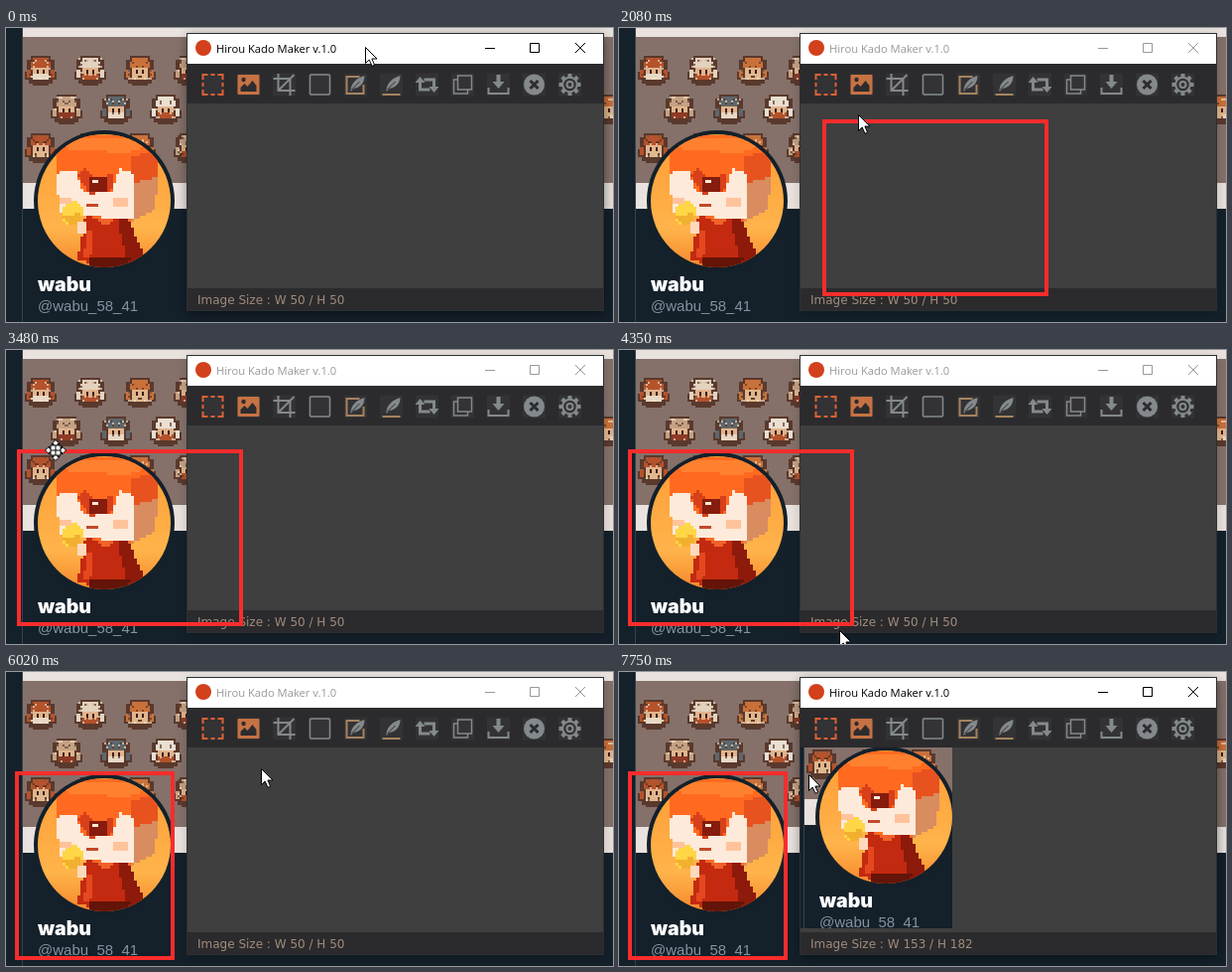
These frames come from a looping animation (612 px wide and 296 px high, 8 s). An HTML page:

```html
<!DOCTYPE html>
<html lang="en">
<head>
<meta charset="utf-8">
<title>Capture tool</title>
<style>
html, body { margin: 0; width: 100%; height: 100%; overflow: hidden; background: #14202a; }
svg { display: block; }
.pixel { shape-rendering: crispEdges; }
.line { fill: none; stroke: currentColor; stroke-width: 2; }
.title { font: 11.2px "Open Sans", "Noto Sans", sans-serif; }
.status { font: 12px "DejaVu Sans", sans-serif; fill: #a08d7c; }
.name { font: 900 19.5px Inter, sans-serif; fill: #fff; }
.handle { font: 15px "Liberation Sans", Arial, sans-serif; fill: #8493a0; }
</style>
</head>
<body>
<svg id="stage" width="612" height="296" viewBox="0 0 612 296"></svg>
<script>
const LOOP = 8000;
const $ = id => document.getElementById(id);
const rect = (x, y, w, h, fill, extra = '') =>
  `<rect x="${x}" y="${y}" width="${w}" height="${h}" fill="${fill}" ${extra}/>`;
const path = (d, fill, extra = '') => `<path d="${d}" fill="${fill}" ${extra}/>`;
const random = seed => { const v = Math.sin(seed * 127.1 + 7) * 43758.5453; return v - Math.floor(v); };

// Little pixel warriors: one body, seeded colours and mirrored speckles
const METALS = ['#b4532c', '#e3d2be', '#c9713a', '#c4a283', '#5d676d', '#e9dfd3'];
const CLOTHS = ['#e8d8c5', '#b3522c', '#dfb88f', '#8e3b26'];

function warrior(x, y, i) {
  const metal = METALS[i % METALS.length], cloth = CLOTHS[i % CLOTHS.length];
  let speckles = '';
  for (let n = 0; n < 12; n++) {
    const seed = i * 31 + n * 3;
    const dx = Math.floor(random(seed) * 6), dy = Math.floor(random(seed + 1) * 11) - 6;
    const tone = random(seed + 2) < 0.5 ? '#53301f' : '#f6e2c6';
    speckles += path(`M${dx} ${dy}h1v1h-1zM${-dx - 1} ${dy}h1v1h-1z`, tone, 'opacity=".65"');
  }
  return `<g transform="translate(${x} ${y}) scale(2)">` +
    path('M-5-7H5v2h2v6h1v4h-2v2h-2v1H-4v-1h-2v-2h-2v-4h1v-6h2z', '#5a392d') +
    path('M-4-6H4v2h1v3H-5v-3h1z', metal) + path('M-4 2H4v3H-4z', cloth) +
    path('M-7 0h2v4h-2zM5 0h2v4h-2z', metal) + speckles +
    path('M-4-1H4v3H-4z', '#e2b48c') + path('M-2 0h1v2h-1zM1 0h1v2h-1z', '#3b1d17') + '</g>';
}

function banner() {
  let out = rect(17, 0, 595, 182, '#e9e2de') + rect(17, 9, 595, 147, '#85716a');
  for (let row = 0; row < 3; row++)
    for (let col = 0; col < 12; col++)
      out += warrior((row === 1 ? 61 : 35) + col * 50, 42 + row * 39, col + row * 3);
  return out;
}

// Fills every cell whose centre lies inside the outline
const probe = document.createElement('canvas').getContext('2d');
function pixelate(outline, fill, cell = 3) {
  const shape = new Path2D(outline);
  let d = '';
  for (let y = 105; y < 243; y += cell)
    for (let x = 30; x < 168; x += cell)
      if (probe.isPointInPath(shape, x + cell / 2, y + cell / 2)) d += `M${x} ${y}h${cell}v${cell}h-${cell}z`;
  return path(d, fill);
}

function portrait() {
  const robe = pixelate('M80 189H122L141 233L108 240L72 234z', '#c32a10') +
    pixelate('M112 189H122L141 233L122 237z', '#8d1a0a') +
    pixelate('M86 189H114L101 199z', '#f0622a') +
    pixelate('M82 203H88L85 232H78z', '#e5481f') +
    pixelate('M84 232L126 230L122 243H86z', '#641408');
  const cube = pixelate('M68 108H144L153 122L151 183L127 194L54 187L50 126z', '#ff6a20') +
    pixelate('M70 110H140L146 117L122 126L58 121z', '#ff8130') +
    pixelate('M127 130L153 121V158L127 160z', '#e8521f') +
    pixelate('M127 157L152 150L151 183L127 194z', '#d88c60') +
    pixelate('M51 146L70 143L78 166H106L114 142L128 146V193L54 187z', '#fdeada');
  const face = pixelate('M72 148L80 142L92 152L110 146L106 165L84 167z', '#d8401a') +
    pixelate('M83 151H103V164H85z', '#861c0d') + pixelate('M87 152H92V157H87z', '#ffe9d6') +
    pixelate('M54 170H66V178H54zM109 172H122V181H109z', '#ffc39c') +
    pixelate('M80 176H92V180H80z', '#c2482a');
  const treat = pixelate('M58 180L70 174L79 182L75 195L64 199L56 191z', '#ffd645') +
    pixelate('M58 190L77 186L72 197H62z', '#f2b030') + pixelate('M71 196H80V206H71z', '#fdd9bd');
  return `<g clip-path="url(#round)" class="pixel">${rect(30, 105, 138, 138, 'url(#sunset)')}${robe}${cube}${face}${treat}</g>`;
}

const page = `<g id="page">${rect(0, 0, 612, 296, '#14202a')}${rect(16, 0, 1, 296, '#35424c')}
  <g class="pixel">${banner()}</g>
  <circle cx="99" cy="174" r="71" fill="#14202a"/>${portrait()}
  <text class="name" x="32" y="265">wabu</text>
  <text class="handle" x="32" y="285">@wabu_58_41</text></g>`;

// Toolbar
const GRAY = '#83898c', TAN = '#a58360', DARK = '#2d2c2e';
const line = (d, color = GRAY, width = 2) =>
  `<path class="line" d="${d}" style="color:${color};stroke-width:${width}"/>`;
const quill = path('M-5 6C-5-1 1-7 9-9C9-2 5 3-2 4L-5 7z', GRAY) + line('M-4 5L4-3', DARK, 1);
const teeth = Array.from({ length: 8 }, (_, i) =>
  rect(-2, -11, 4, 4, GRAY, `transform="rotate(${i * 45})"`)).join('');

const icons = [
  line('M-10-5V-10H-5M-2-10H2M5-10H10V-5M10-2V2M10 5V10H5M2 10H-2M-5 10H-10V5M-10 2V-2', '#dc6034'),
  rect(-11, -10, 22, 20, '#c67243', 'rx="1"') + path('M-8 7V3L-4-1L-1 2L4-4L8 1V7z', DARK) +
    `<circle cx="-5" cy="-5" r="2.2" fill="${DARK}"/>`,
  line('M-6-11V6H11M-11-6H6V11M-6 6L10-10'),
  line('M-9-10H9L10-9V9L9 10H-9L-10 9V-9z', GRAY, 1.5),
  line('M4-8H-9V9H8V0', TAN) + quill,
  quill + line('M-9 10H9', TAN),
  line('M-7-4V5H3M7 4V-5H-3', GRAY, 3) + path('M-12-2L-7-8L-2-2zM12 2L7 8L2 2z', GRAY),
  line('M-5-9H9V5H-5zM-5-5H-9V9H5V5', GRAY, 1.5),
  line('M-10 3V9H10V3') + path('M-2-10H2V-3H6L0 4L-6-3H-2z', GRAY),
  `<circle r="10.5" fill="${GRAY}"/>` + line('M-4-4L4 4M4-4L-4 4', DARK, 3),
  teeth + `<circle r="7.3" fill="none" stroke="${GRAY}" stroke-width="2"/>
    <circle r="3" fill="none" stroke="${GRAY}" stroke-width="2"/>`
];
const iconX = i => 208.5 + i * 36;
const toolbar = icons.map((icon, i) => `<g transform="translate(${iconX(i)} 57)">
  ${rect(-11.5, -11.5, 23, 23, '', `id="tile${i}"`)}${icon}</g>`).join('');

const appWindow = `
  ${rect(183, 6, 420, 279, '#000', 'id="shadow"')}
  ${rect(182.5, 5.5, 420, 279, '#3f3f3f', 'stroke="#2c3033"')}
  ${rect(183, 6, 419, 30, '#fff')}${rect(183, 36, 419, 40, '#2b2a2d')}${rect(183, 262, 419, 22, '#2b2a2d')}
  <circle cx="199" cy="20" r="8" fill="#d2401c"/>
  <g id="caption"><text class="title" x="212" y="25" fill="currentColor">Hirou Kado Maker v.1.0</text>
  <path d="M483 20.5H493M528.5 15.5H537.5V24.5H528.5zM574 15L584 25M584 15L574 25" fill="none" stroke="currentColor"/></g>
  ${toolbar}
  <g id="capture" clip-path="url(#shot)"><use href="#page" x="170" y="-28"/></g>
  <text class="status" id="size" x="193" y="278"></text>`;

// Pointers
const outlined = d => path(d, '#fff', 'stroke="#000" stroke-linejoin="round"');
const pointers = {
  arrow: outlined('M.5.5V16.5L4.2 13L7 19.3L9.6 18.2L6.9 12H12z'),
  drag: outlined('M0-10.5L4-6.5H2V-2H6.5V-4L10.5 0L6.5 4V2H2V6.5H4L0 10.5L-4 6.5H-2V2H-6.5V4L-10.5 0L-6.5-4V-2H-2V-6.5H-4z') +
    outlined('M-5-5H5V5H-5zM-5 0H5M0-5V5'),
  resize: outlined('M-7.5-7.5H-1L-3.2-5.2L5.2 3.2L7.5 1V7.5H1L3.2 5.2L-5.2-3.2L-7.5-1z')
};

$('stage').innerHTML = `<defs>
  <linearGradient id="sunset" x2="0" y2="1"><stop stop-color="#ff9a35"/>
    <stop offset=".7" stop-color="#ffb44b"/><stop offset="1" stop-color="#f5852a"/></linearGradient>
  <clipPath id="round"><circle cx="99" cy="174" r="67"/></clipPath>
  <clipPath id="shot"><rect x="183" y="76" width="153" height="182"/></clipPath></defs>
  ${page}${appWindow}
  <rect id="frame" fill="none" stroke="#fa2c2c" stroke-width="4"/>
  <g id="pointer">${Object.entries(pointers).map(([id, body]) => `<g id="${id}">${body}</g>`).join('')}</g>`;

// Each move: when it runs, where it ends, how far the path sags
const moves = [
  { from: 330, to: 1100, x: 212, y: 60 },
  { from: 1350, to: 1380, x: 214, y: 61 },
  { from: 1720, to: 2080, x: 241, y: 87 },
  { from: 2200, to: 2540, x: 244, y: 93 },
  { from: 2875, to: 3480, x: 50, y: 101, sag: 8 },
  { from: 3560, to: 3610, x: 48, y: 101 },
  { from: 3900, to: 4350, x: 222, y: 282 },
  { from: 4500, to: 4630, x: 227, y: 277 },
  { from: 4870, to: 5510, x: 162, y: 287 },
  { from: 5750, to: 6020, x: 257, y: 97 },
  { from: 6020, to: 6210, x: 247, y: 58 },
  { from: 7110, to: 7750, x: 191, y: 103, sag: 10 }
];
const clamp = (v, low, high) => Math.min(high, Math.max(low, v));
const easeOut = p => Math.sin(p * Math.PI / 2);

function pointerAt(t) {
  let x = 362, y = 19;
  for (const move of moves) {
    const p = easeOut(clamp((t - move.from) / (move.to - move.from), 0, 1));
    x += (move.x - x) * p;
    y += (move.y - y) * p + (move.sag || 0) * Math.sin(Math.PI * p);
  }
  return { x: Math.round(x), y: Math.round(y) };
}

// The frame follows the pointer while dragged, then shrinks with it
function frameAt(t) {
  const grip = pointerAt(clamp(t, 2800, 3700));
  const shrink = (227 - pointerAt(clamp(t, 4800, 5600)).x) / 65;
  return {
    x: grip.x - 37, y: grip.y + 1,
    width: Math.round(224 - 67 * shrink), height: Math.round(174 + 12 * shrink)
  };
}

const show = (id, on) => { $(id).style.display = on ? '' : 'none'; };

function render(t) {
  const active = t < 1530 || t >= 6770;
  const captured = t >= 6870;
  const at = pointerAt(t);
  const kind = t >= 2330 && t < 3930 ? 'drag' : t >= 4560 && t < 5780 ? 'resize' : 'arrow';

  $('caption').style.color = active ? '#000' : '#999';
  $('shadow').style.filter = `drop-shadow(0 2px 6px rgba(0,0,0,${active ? 0.45 : 0.2}))`;
  $('size').textContent = `Image Size : ${captured ? 'W 153 / H 182' : 'W 50 / H 50'}`;
  show('capture', captured);

  icons.forEach((_, i) => {
    const over = Math.max(Math.abs(at.x - iconX(i)), Math.abs(at.y - 57)) < 12;
    $('tile' + i).setAttribute('fill', over ? '#3d3c3e' : '#333234');
  });

  show('frame', t >= 1530);
  for (const [key, value] of Object.entries(frameAt(t))) $('frame').setAttribute(key, value);

  for (const id in pointers) show(id, id === kind);
  $('pointer').setAttribute('transform', `translate(${at.x} ${at.y})`);
}

const start = performance.now();
function tick() {
  render((performance.now() - start) % LOOP);
  requestAnimationFrame(tick);
}
tick();
</script>
</body>
</html>
```
